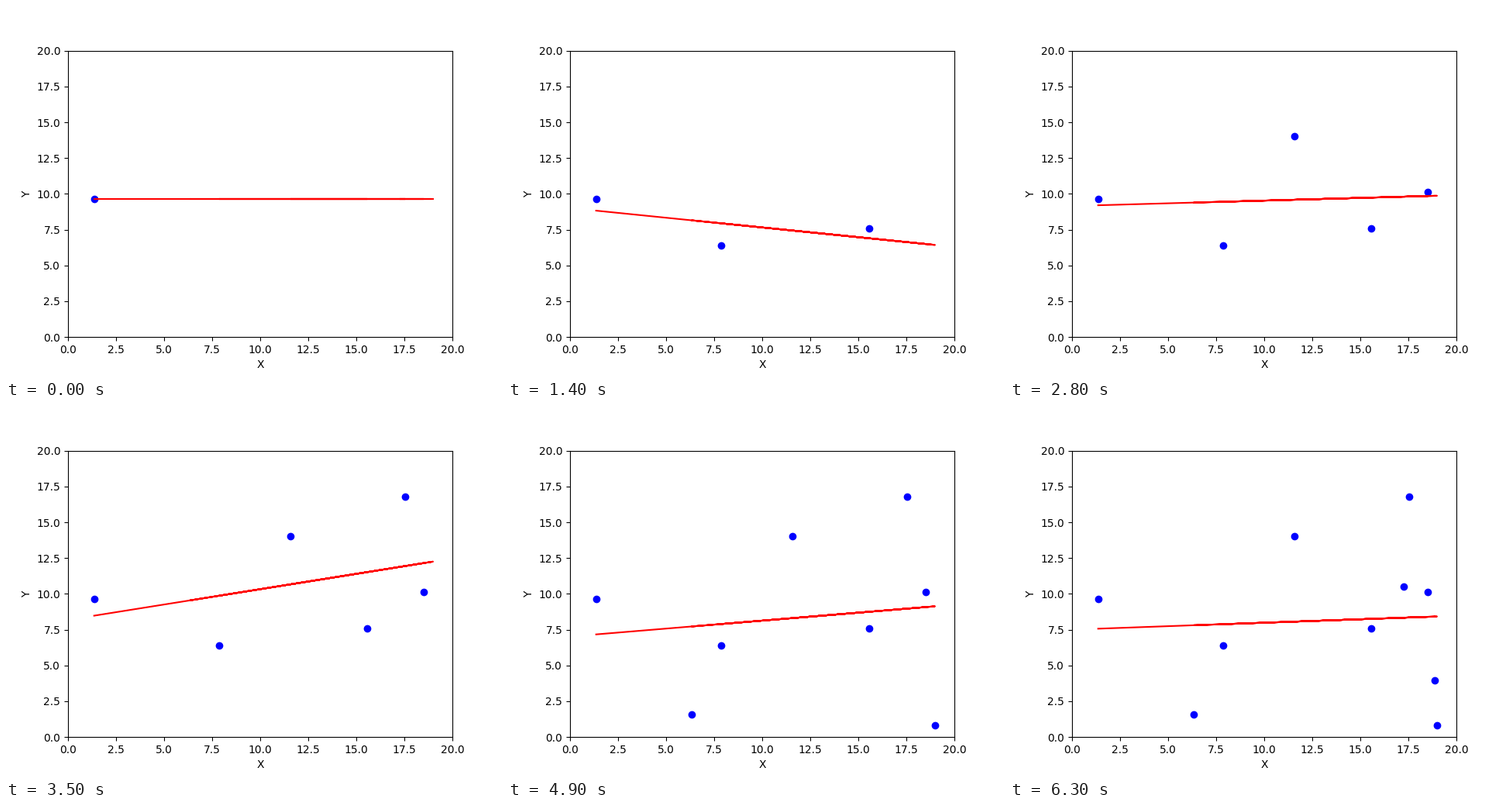
Write a matplotlib script that moves like this. It is 640 by 480 pixels and loops after 7.7 s.

```python
import numpy as np
import matplotlib.pyplot as plt
from matplotlib.animation import FuncAnimation

STEP_MS = 700
HOLD = 1  # extra steps on the complete plot

# Samples in order of arrival; every fitted line is computed from them.
points = np.array([
    (1.36, 9.66), (15.57, 7.60), (7.86, 6.41), (18.51, 10.13), (11.57, 14.03),
    (17.54, 16.79), (6.33, 1.58), (18.99, 0.82), (17.26, 10.51), (18.87, 3.96),
])
xs = points[:, 0]

fig, ax = plt.subplots(figsize=(6.4, 4.8), dpi=100)
ax.set(xlim=(0, 20), ylim=(0, 20), xlabel="X", ylabel="Y")
dots = ax.scatter([], [], color="blue")
line, = ax.plot([], [], color="red")


def update(step):
    """Show the samples so far with their least-squares line."""
    seen = points[:step + 1]
    degree = min(len(seen) - 1, 1)  # a lone sample gives a flat line
    fit = np.polyfit(*seen.T, degree)
    dots.set_offsets(seen)
    line.set_data(xs, np.polyval(fit, xs))
    return dots, line


def init():
    return update(0)


anim = FuncAnimation(fig, update, frames=len(points) + HOLD, init_func=init,
                     interval=STEP_MS, repeat=True, repeat_delay=0)
plt.show()
```
